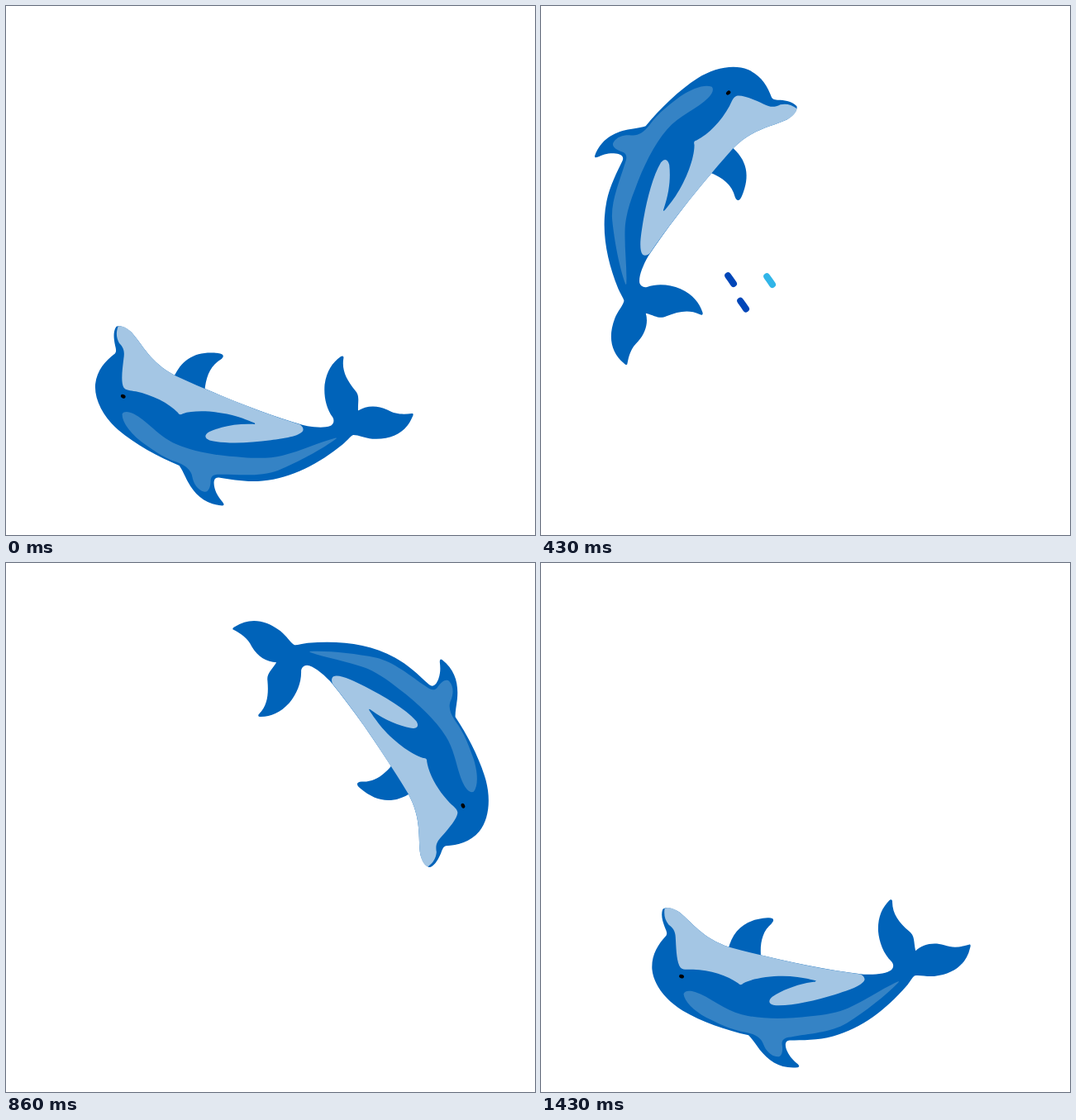
Write an HTML page that moves like this. It is 640 px wide and 640 px high and loops after 1.5 s.

```html
<!DOCTYPE html>
<html lang="en">
<head>
<meta charset="utf-8">
<title>Leaping dolphin</title>
<style>
  html, body { margin: 0; height: 100%; overflow: hidden; background: #fff; }
  svg { display: block; width: 100vw; height: 100vh; }
</style>
</head>
<body>
<svg id="stage" viewBox="0 0 640 640">
  <g id="dolphin">
    <g fill="#0063b9">
      <path d="M387 168C387 185 383 199 371 207.500C366 212 368 215 375 215C401 215.500 418 205 426 180Z"/>
      <path d="M354 31.700C375 31.500 388 42 398 57C403 65 406 71 410 75.500C436 83.500 466 97 487 112
        C506 126 519.500 146 519.500 165C519 182 510 194 499 204C497 207 498.500 210 500 215
        C502 222 503.500 230 500.500 236C498 238.500 490 238 481 231C466 217 456 197 424 183.500
        C372 165 318 148 265 137C251 135 237 135.500 231 139.500C228 142 227.500 146 230 149.500
        C239 160 243 174 243 188C242 205 236 215 227 223C224 225.500 222.500 224 223 221
        C224 207 217 196 206 184.500C199 178 201.500 172 200 160C191 167 178 169 165 164
        C154 159 145 160 135 162C132.500 162.500 133 160 134 158C140 139 156 128 180 127.500
        C190 127.500 198 131 204 130C207 128 210 123 215 118C242 92 273 72 308 65.500
        C327 62 346 64 361 65C367 65 367.500 59 365 52C362 44 358 40 353.500 35.500C351.500 33 352 32 354 31.700Z"/>
    </g>
    <path fill="#3583c5" d="M223 124.500C239 110 267 92 290 80C310 70 338 71 359 69C368 69 371 66 370.500 60
      C370 53 372 46 377 46.500C386 48 391 56 393 63C395 71 402 76 412 79
      C432 84 447 94 459 101C474 111 484 123 484 132C482 136 476 135.500 470 133
      C453 126 437 108 416 101C393 93 361 91 335 92C315 92 299 94 287 98C264 106 244 118 224 125Z"/>
    <path fill="#a4c6e4" d="M498 237C500 229 499 223 495 217C488 211 487.500 206 488 198
      C488.500 184 489 170 485 164C482 160.500 477 161 470 160.500C450 158 429 150 417 139
      C415 136 413 137 411 138.500C397 144.500 368 145.500 345 140.500C336 138.500 328 136 323.500 134.500
      C322 133 324 133 326 133C346 132 363 127 377 119.500C383 115.500 383 111 376 109
      C356 106 328 110 302 115.500C287 119 268 123 264.500 130C263.500 133 266 136 269 137.500
      C318 148 372 165 424 183.500C456 197 466 217 481 231C488 237 494 238.500 498 237Z"/>
    <ellipse cx="484.700" cy="153.200" rx="3" ry="2.200" transform="rotate(25 484.700 153.200)"/>
  </g>
</svg>
<script>
const LOOP = 1500, STEPS = 21, POSES = 37;
const stage = document.getElementById('stage');
const dolphin = document.getElementById('dolphin');
const clamp = v => Math.max(0, Math.min(1, v));

// Each jet is drawn three times; head and tail are [start, duration] in poses.
const jets = [
  { x: 33.5, y: 309.5, d: 'M43 0C28 -6 17 -11 0 0', cap: 'round', head: [2, 2], tail: [4, 3],
    colors: ['#0066ff', '#0066ff', '#0066ff'] },
  { x: 140, y: 306, d: 'M0 0C35 -24 65 -13 93 30', cap: 'round', head: [2.3, 6], tail: [5, 6.7],
    colors: ['#0046b8', '#31b5e8', '#0046b8'] },
  { x: 79, y: 265, d: 'M12 22Q7 9 0 0', cap: 'butt', head: [2, 2], tail: [4, 3],
    colors: ['#0046b8', '#0046b8', '#1f70f2'] }
];
const copies = [[0, 0], [47, 1], [15, 30.5]];
const splashes = [{ x: 0, y: 0, start: 0 }, { x: 391, y: -1, start: 20 }];
const strokes = [];

for (const splash of splashes) for (const jet of jets) copies.forEach(([dx, dy], i) => {
  const path = document.createElementNS('http://www.w3.org/2000/svg', 'path');
  const paleTip = splash.start && jet === jets[1] && i === 0;
  const attrs = {
    d: jet.d, fill: 'none', pathLength: 100, 'stroke-width': 8, 'stroke-linecap': jet.cap,
    stroke: paleTip ? '#52d8f0' : jet.colors[i],
    transform: `translate(${splash.x + jet.x + dx} ${splash.y + jet.y + dy})`
  };
  for (const name in attrs) path.setAttribute(name, attrs[name]);
  stage.append(path);
  strokes.push({ path, jet, start: splash.start });
});

function draw(now) {
  const step = Math.min(STEPS - 1, Math.floor((now % LOOP + 5) * STEPS / LOOP));
  const pose = Math.round(step * (POSES - 1) / (STEPS - 1));
  dolphin.setAttribute('transform', `rotate(${(pose - 18) * 360 / POSES} 320 320)`);
  for (const { path, jet, start } of strokes) {
    const progress = ([from, span]) => 100 * clamp((pose - start - from) / span);
    const tail = progress(jet.tail), length = progress(jet.head) - tail;
    path.style.display = length > 0 ? '' : 'none';
    path.setAttribute('stroke-dasharray', `${length} 300`);
    path.setAttribute('stroke-dashoffset', -tail);
  }
}

const begin = performance.now();
function tick() {
  draw(performance.now() - begin);
  requestAnimationFrame(tick);
}
tick();
</script>
</body>
</html>
```
